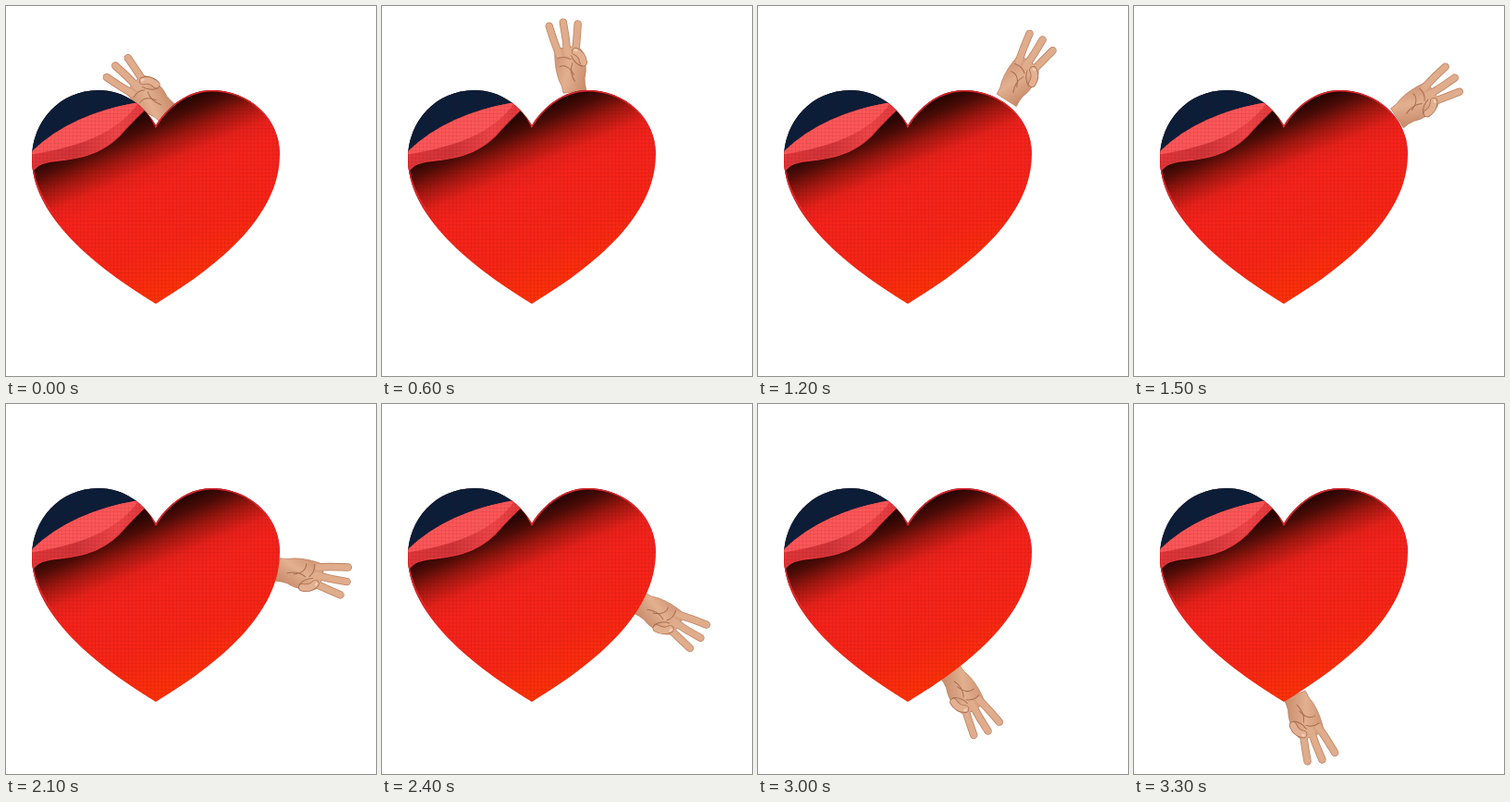
Animation, 400 px wide and 400 px high, one loop 3.45 s. Source, as an HTML page:

```html
<!DOCTYPE html>
<html lang="en">
<head>
<meta charset="utf-8">
<title>Hand around a heart</title>
<style>
html, body { margin: 0; width: 100%; height: 100%; overflow: hidden; background: #fff; }
svg { display: block; width: 100vw; height: 100vh; }
</style>
</head>
<body>
<svg viewBox="0 0 400 400">
  <defs>
    <path id="shape" d="M162 129C150 108 128 91 100 91C58 91 28 125 28 165C28 222 85 275 162 322C240 275 296 222 296 160C296 121 263 91 222 91C197 91 175 108 162 129Z"/>
    <clipPath id="inside"><use href="#shape"/></clipPath>
    <linearGradient id="red" gradientUnits="userSpaceOnUse" x1="65" y1="157" x2="139" y2="332">
      <stop offset="0" stop-color="#280603"/>
      <stop offset=".07" stop-color="#4d0c07"/>
      <stop offset=".17" stop-color="#a01810"/>
      <stop offset=".28" stop-color="#e6211b"/>
      <stop offset=".38" stop-color="#f4231c"/>
      <stop offset=".72" stop-color="#f62516"/>
      <stop offset="1" stop-color="#fc3207"/>
    </linearGradient>
    <linearGradient id="strip">
      <stop offset="0" stop-color="#e0363a"/>
      <stop offset=".4" stop-color="#cf3438"/>
      <stop offset=".75" stop-color="#ee4548"/>
      <stop offset="1" stop-color="#e0383b"/>
    </linearGradient>
    <linearGradient id="skin" gradientUnits="userSpaceOnUse" x1="-15" y1="-6" x2="18" y2="8">
      <stop offset="0" stop-color="#d49b7a"/>
      <stop offset=".4" stop-color="#e2b090"/>
      <stop offset="1" stop-color="#c98d6c"/>
    </linearGradient>
    <pattern id="weave" width="4" height="4" patternUnits="userSpaceOnUse">
      <path d="M0 .5H4M.5 0V4" stroke="#500" stroke-opacity=".07"/>
    </pattern>
    <path id="fingers" d="M-9-20Q-13-36-15.5-52M0-20Q1-36 0-54M9-20Q12.5-35 15.5-50"/>
    <path id="palm" d="M-13-25Q0-29 13-25Q19-18 18-8Q18 2 15 9Q14 15 15 22H-10Q-10 14-13 7Q-16-8-13-25Z"/>
    <path id="thumb" d="M16-8Q16-17 9-21"/>
  </defs>

  <g id="hand" stroke-linecap="round" stroke-linejoin="round" fill="none">
    <path d="M-11 20Q2 25 16 20V34H-11Z" fill="#fafafa"/>
    <use href="#fingers" stroke="#bd8262" stroke-width="8.4"/>
    <use href="#palm" fill="url(#skin)" stroke="#b97f5f" stroke-width=".7"/>
    <use href="#fingers" stroke="#dfac8c" stroke-width="6.8"/>
    <use href="#thumb" stroke="#a96e4f" stroke-width="8.5"/>
    <use href="#thumb" stroke="#e3b191" stroke-width="6.8"/>
    <path d="M7-22Q9-25 12-22Q10-19 7-22" fill="#f0cdb8"/>
    <path d="M-11-16Q-3-18 3-13M4-17Q6-8 14-4M-10-7Q-1-9 4 4M4-9Q-1 0 4 11" stroke="#a86e50"/>
  </g>

  <g clip-path="url(#inside)">
    <path d="M0 0H400V400H0Z" fill="url(#red)"/>
    <path d="M20 80H150L142 107L80 160L20 172Z" fill="#0a1e39"/>
    <path d="M24 162Q66 117 144 104L152 110Q138 123 122 141C94 168 62 165 45 169Q32 171 28 181Z" fill="url(#strip)"/>
    <path d="M24 161Q66 117 144 104C125 130 94 151 24 161Z" fill="#fb5658"/>
    <path d="M28 181Q32 171 45 169C62 165 94 168 122 141Q138 123 152 110" fill="none" stroke="#ee3a3c" stroke-width="1.2"/>
    <path d="M141 104Q155 113 162 129C175 108 197 91 222 91C263 91 296 121 296 160" fill="none" stroke="#e8262c" stroke-width="3"/>
    <path d="M28 165C28 185 36 204 50 224" fill="none" stroke="#e8262c" stroke-width="2"/>
    <path d="M0 0H400V400H0Z" fill="url(#weave)"/>
  </g>
</svg>
<script>
const STEP = 150, STEPS = 23, SPAN = 3; // ms per step, steps per loop, steps between keys
// palm x, palm y, turn in degrees
const keys = [
  [157, 102, -46], [184, 76, -16], [247, 69, 9], [291, 93, 45], [315, 142, 80],
  [310, 202, 112], [264, 270, 138], [201, 322, 154], [159, 350, 166]
];
const hand = document.getElementById("hand");

// Catmull-Rom curve through four values
const spline = (a, b, c, d, t) =>
  b + t / 2 * (c - a + t * (2 * a - 5 * b + 4 * c - d + t * (3 * (b - c) + d - a)));

function pose(step) {
  const i = Math.floor(step / SPAN), t = step / SPAN - i;
  const key = n => keys[Math.max(0, Math.min(n, keys.length - 1))];
  return key(i).map((b, n) => spline(key(i - 1)[n], b, key(i + 1)[n], key(i + 2)[n], t));
}

function draw(now) {
  const [x, y, turn] = pose(Math.floor(now / STEP) % STEPS);
  hand.setAttribute("transform", `translate(${x} ${y}) rotate(${turn})`);
  requestAnimationFrame(draw);
}
draw(performance.now());
</script>
</body>
</html>
```
